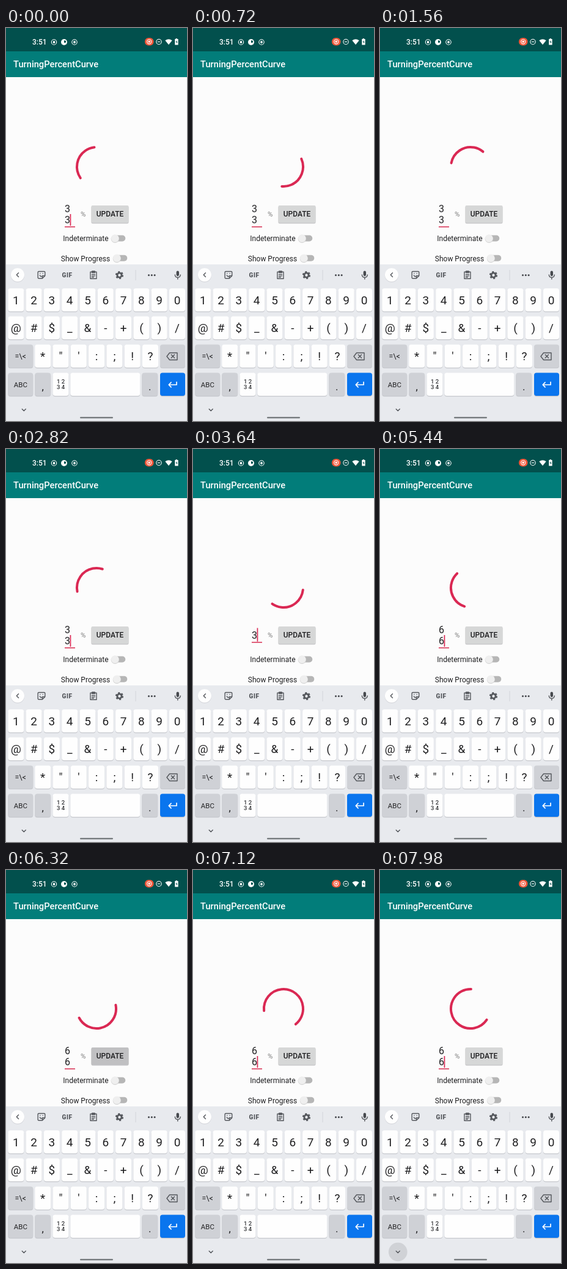
Animation, 296 px wide and 640 px high, one loop 8 s. Source, as an HTML page:

```html
<!DOCTYPE html>
<html lang="en">
<head>
<meta charset="utf-8">
<title>Progress ring</title>
<style>
  html, body { margin: 0; width: 100%; height: 100%; overflow: hidden; background: #fcfcfc; }
  svg { display: block; width: 296px; height: 640px; font-family: Roboto, sans-serif; }
  .mid { text-anchor: middle; }
  .line { fill: none; stroke: #54575c; stroke-width: 1.4; stroke-linecap: round; stroke-linejoin: round; }
  .white { fill: none; stroke: #fff; stroke-width: 1.1; }
</style>
</head>
<body>
<svg viewBox="0 0 296 640">
  <rect width="296" height="640" fill="#fcfcfc"/>
  <rect width="296" height="38" fill="#02504d"/>
  <rect y="38" width="296" height="42" fill="#027d7a"/>

  <g id="status" fill="#fff">
    <text x="43" y="27.3" font-size="12" font-weight="500">3:51</text>
    <g class="white">
      <circle cx="78.5" cy="23" r="4.2"/><circle cx="112" cy="23" r="4.2"/>
      <circle cx="250" cy="22.5" r="4.2"/><path d="M248 22.5h4"/>
    </g>
    <circle cx="78.5" cy="23" r="1.9"/><circle cx="112" cy="23" r="1.9"/>
    <circle cx="95" cy="23" r="5"/>
    <path d="M95 20.3h1.3a1.9 1.9 0 0 1 0 3.8H95z" fill="#02504d"/>
    <rect x="227" y="16" width="14.5" height="12.5" rx="6" fill="#f0573a"/>
    <circle class="white" cx="234.2" cy="22.3" r="3.6"/><circle cx="234.2" cy="22.3" r="1.7"/>
    <path d="M260.3 20.3q5.7-4.2 11.4 0L266 27.3z"/>
    <path d="M277.6 18v-1h2.4v1h1.6v9.5h-5.4V18z"/>
    <path d="M279.3 20l-1.7 3h1.2v2.5l1.7-3h-1.2z" fill="#02504d"/>
  </g>
  <text x="12" y="64.2" font-size="14.7" font-weight="500" fill="#fff">TurningPercentCurve</text>

  <circle id="ring" cx="148" cy="226" r="32" pathLength="360" fill="none"
    stroke="#da2853" stroke-width="4" stroke-linecap="round"/>

  <g fill="#202022" font-size="16">
    <text id="top" x="96" y="299.7"></text>
    <text id="low" x="96" y="318"></text>
  </g>
  <rect id="under" x="96" width="17" height="1.6" fill="#da3a5c"/>
  <rect id="caret" width="1.7" fill="#da2853"/>
  <text x="122" y="307" font-size="11.5" fill="#808080">%</text>
  <rect x="139.5" y="290" width="61" height="28.5" rx="2" fill="#c4c4c6"/>
  <rect id="button" x="139.5" y="289" width="61" height="28.3" rx="2"/>
  <text class="mid" x="170" y="307.2" font-size="12" font-weight="500" fill="#1e1e20">UPDATE</text>

  <g font-size="12" fill="#1e1e20">
    <text x="93.3" y="347.2">Indeterminate</text>
    <text x="89.8" y="379.5">Show Progress</text>
  </g>
  <g id="toggles"></g>

  <rect y="385" width="296" height="255" fill="#e8eaee"/>
  <g id="tools">
    <circle cx="19" cy="402.8" r="11.2" fill="#d3d5da"/>
    <circle cx="19" cy="402" r="11" fill="#fefefe"/>
    <path class="line" d="M20.5 398.8l-3.2 3.2 3.2 3.2"/>
    <path class="line" d="M53.5 396.5h9q1.3 0 1.3 1.3v5.7l-4.3 4.3h-6q-1.3 0-1.3-1.3v-8.7q0-1.3 1.3-1.3zM63.5 403.5h-4v4M55.3 402.8q1.5 2.5 3.4 1.6M55.8 399.8h.1M60.2 399.8h.1"/>
    <text class="mid" x="100" y="405.7" font-size="10" font-weight="900" letter-spacing=".5" fill="#54575c">GIF</text>
    <path class="line" d="M138 397.3h10v11h-10zM140.8 396h4.4v2.4h-4.4zM140.5 401.3h5M140.5 403.6h5M140.5 405.8h3"/>
    <circle cx="185.5" cy="402.5" r="5.4" fill="none" stroke="#54575c" stroke-width="2.4" stroke-dasharray="2.85 2.8"/>
    <circle cx="185.5" cy="402.5" r="3.6" fill="none" stroke="#54575c" stroke-width="2.8"/>
    <path d="M212 394v17" stroke="#d3d5da"/>
    <g fill="#46494e">
      <circle cx="233.5" cy="402.5" r="1.5"/><circle cx="238.3" cy="402.5" r="1.5"/><circle cx="243.1" cy="402.5" r="1.5"/>
      <rect x="278.6" y="395.5" width="4.4" height="8.5" rx="2.2"/>
    </g>
    <path class="line" d="M276.3 402q.4 4.2 4.5 4.2t4.5-4.2M280.8 406.4v2.6"/>
  </g>
  <g id="keys"></g>
  <g id="pop">
    <rect x="148" y="370" width="29.5" height="95" rx="3" fill="#c8cad0"/>
    <text class="mid" x="162" y="398.5" font-size="21" fill="#1e1e20">6</text>
    <text class="mid" x="169.5" y="409" font-size="9" fill="#1e1e20">…</text>
  </g>
  <circle id="press" cx="29.3" cy="622" r="15.3" fill="#d0d2d6"/>
  <path class="line" d="M26.3 620.5l3 3 3-3"/>
  <rect x="121" y="633.5" width="54" height="2" rx="1" fill="#62686a"/>
</svg>

<script>
const $ = id => document.getElementById(id);
const NS = 'http://www.w3.org/2000/svg';
const LOOP = 8000, CELL = 140;

function add(parent, tag, attrs, text) {
  const el = document.createElementNS(NS, tag);
  for (const name in attrs) el.setAttribute(name, attrs[name]);
  if (text) el.textContent = text;
  parent.append(el);
  return el;
}
function set(id, attrs) {
  for (const name in attrs) $(id).setAttribute(name, attrs[name]);
}
function show(id, on) { set(id, { visibility: on ? 'visible' : 'hidden' }); }

function toggle(x, y) {
  const g = $('toggles');
  add(g, 'rect', { x: x - 4, y: y - 5, width: 21, height: 10, rx: 5, fill: '#b6b6b6' });
  add(g, 'circle', { cx: x, cy: y + 0.8, r: 6.6, fill: '#d4d4d4' });
  add(g, 'circle', { cx: x, cy: y, r: 6.3, fill: '#efefef' });
}

const WHITE = '#fefefe', DIM = '#cfd1d6', BLUE = '#0a75ee';
function key(x, y, w, label, fill = WHITE, size = 19, drop = 0) {
  const g = $('keys');
  add(g, 'rect', { x, y: y + 1.2, width: w, height: 37.5, rx: 4, fill: '#c6c8cd' });
  add(g, 'rect', { x, y, width: w, height: 37.5, rx: 4, fill });
  if (label) add(g, 'text', {
    x: x + w / 2, y: y + 19 + size * 0.36 + drop, class: 'mid', 'font-size': size, fill: '#202022'
  }, label);
}
function row(labels, x, y) {
  [...labels].forEach((c, i) => key(x + i * 29.3, y, 26, c));
}

function buildKeys() {
  const g = $('keys');
  row('1234567890', 3.3, 424);
  row('@#$_&-+()/', 3.3, 469.5);
  key(3.3, 515.5, 41, '=\\<', DIM, 12.5);
  row('*"\':;!?', 47.2, 515.5);
  key(252, 515.5, 41, '', DIM);
  add(g, 'path', { class: 'line', d: 'M267.5 529h12.5v11.5h-12.5l-4.5-5.75zM270.3 532l5.2 5.2M275.5 532l-5.2 5.2' });
  key(3.3, 561.5, 41, 'ABC', DIM, 11.5);
  key(47.2, 561.5, 26, ',', DIM, 17, 3);
  key(76.5, 561.5, 26, '');
  ['1 2', '3 4'].forEach((s, i) => add(g, 'text', {
    x: 89.5, y: 579 + i * 9, class: 'mid', 'font-size': 9.5, 'font-weight': 500, fill: '#323336'
  }, s));
  key(105.3, 561.5, 114, '');
  key(222.3, 561.5, 26, '.', DIM, 17, 3);
  key(252, 561.5, 41, '', BLUE);
  add(g, 'path', { class: 'line', style: 'stroke:#fff;stroke-width:1.7', d: 'M279 576.5v4.5h-12.5M270 577.2l-3.8 3.8 3.8 3.8' });
}

// Screen frames come in threes, held for 20, 100 and 20 ms.
function frameAt(t) {
  const r = t % CELL;
  return Math.floor(t / CELL) * 3 + (r < 20 ? 0 : r < 120 ? 1 : 2);
}

// The ring turns once in about 30 frames, slightly unevenly.
const TURN = [[0, 235], [34, 641], [61, 979], [92, 1339], [116, 1638], [136, 1879], [171, 2284]];
function turnAt(k) {
  let i = 1;
  while (i < TURN.length - 1 && k > TURN[i][0]) i++;
  const [k0, a0] = TURN[i - 1], [k1, a1] = TURN[i];
  return a0 + (a1 - a0) * (k - k0) / (k1 - k0);
}
function percentAt(k) {
  const u = Math.min(1, Math.max(0, (k - 129.7) / 15));
  return 33 + 33 * (1 - Math.cos(Math.PI * u)) / 2;
}

// Each edit restarts the caret's blink.
const EDITS = [[-12, '33'], [75, '3'], [83, ''], [94, '6'], [108, '66']];
const BLINK = 30;
const within = (k, a, b) => k >= a && k < b;

function draw(t) {
  const k = frameAt(t);
  set('ring', {
    transform: `rotate(${turnAt(k) - 90} 148 226)`,
    'stroke-dasharray': `${percentAt(k) * 3.6} 720`
  });

  const [edited, text] = EDITS.filter(e => e[0] <= k).pop();
  const two = text.length > 1;
  $('top').textContent = text[0] || '';
  $('low').textContent = text[1] || '';
  set('top', { y: two ? 299.7 : 309 });
  set('under', { y: two ? 323 : 314 });
  set('caret', { x: text ? 104.6 : 96.2, y: two ? 303 : 291.5, height: two ? 19 : 22 });
  show('caret', (k - edited) % BLINK < BLINK / 2);

  set('button', { fill: within(k, 128, 141) ? '#c0c0c2' : '#d6d7d7' });
  show('pop', within(k, 91, 94) || within(k, 105, 108));
  show('press', k >= 169);
}

toggle(178.3, 342.5);
toggle(181.3, 374.8);
buildKeys();

const start = performance.now();
function tick() {
  draw((performance.now() - start) % LOOP);
  requestAnimationFrame(tick);
}
tick();
</script>
</body>
</html>
```
